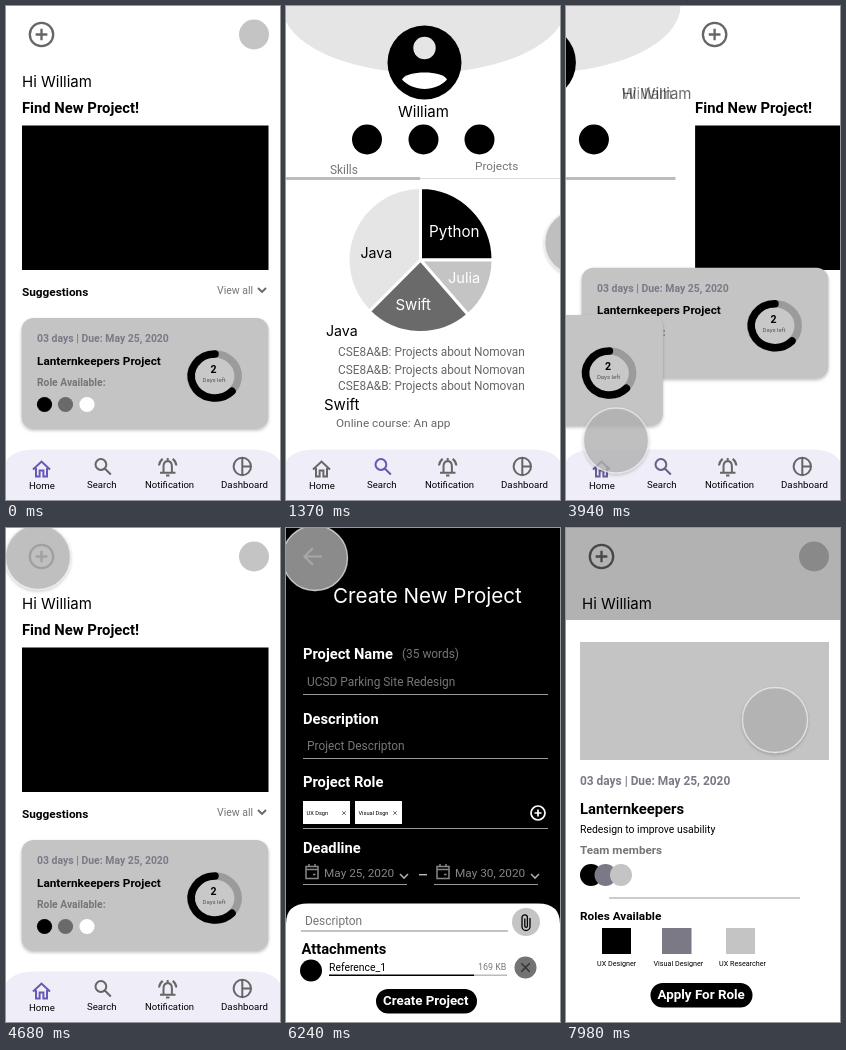
Write an HTML page that moves like this. It is 274 px wide and 494 px high and loops after 8 s.

```html
<!DOCTYPE html>
<html lang="en">
<head>
<meta charset="utf-8">
<title>Project finder prototype</title>
<style>
html, body { margin: 0; width: 100%; height: 100%; overflow: hidden; background: #fff; }
svg { display: block; width: 100vw; height: 100vh; }
text { font-family: Roboto, Arial, sans-serif; white-space: pre; }
.round { font-family: Inter, "Open Sans", sans-serif; }
.b { font-weight: 700; }
.line { fill: none; stroke: currentColor; stroke-width: 2; }
</style>
</head>
<body>
<svg id="stage" viewBox="0 0 274 494"></svg>
<script>
const GREY = '#757575', MUTED = '#7c7987', SILVER = '#c4c4c4';
const text = (x, y, size, s, fill = '#000', cls = '') =>
  `<text x="${x}" y="${y}" font-size="${size}" fill="${fill}" class="${cls}">${s}</text>`;
const bold = (x, y, size, s, fill) => text(x, y, size, s, fill, 'b');
const round = (x, y, size, s, fill) => text(x, y, size, s, fill, 'round');
const rect = (x, y, w, h, fill, rx = 0) =>
  `<rect x="${x}" y="${y}" width="${w}" height="${h}" rx="${rx}" fill="${fill}"/>`;
const dot = (x, y, r, fill) => `<circle cx="${x}" cy="${y}" r="${r}" fill="${fill}"/>`;
const line = (d, color, width = 2) =>
  `<path d="${d}" fill="none" stroke="${color}" stroke-width="${width}"/>`;
const plus = (x, y, r, color, w) =>
  `<circle cx="${x}" cy="${y}" r="${r}" fill="none" stroke="${color}" stroke-width="${w}"/>` +
  line(`M${x - r / 2} ${y}h${r}M${x} ${y - r / 2}v${r}`, color, w);
const cross = (x, y, r, color, w) =>
  line(`M${x - r} ${y - r}l${2 * r} ${2 * r}m0 ${-2 * r}l${-2 * r} ${2 * r}`, color, w);
const group = (id, body) => `<g id="${id}">${body}</g>`;

// Project card, drawn with its top edge at 0
const card = id => group(id,
  `<rect x="15.5" width="247" height="111" rx="12" fill="${SILVER}" filter="url(#soft)"/>` +
  bold(31, 24, 10.45, '03 days | Due: May 25, 2020', MUTED) +
  bold(31, 46.5, 11.8, 'Lanternkeepers Project') +
  bold(31, 68, 10.3, 'Role Available:', GREY) +
  dot(38.5, 86.5, 7.6, '#000') + dot(59.5, 86.5, 7.6, '#6a6a6a') + dot(81, 86.5, 7.6, '#fff') +
  `<ellipse cx="208.5" cy="58" rx="23.7" ry="22" fill="#c8c8c8" stroke="#9b9b9b" stroke-width="7.5"/>
  <path d="M209 36A23.7 22 0 1 0 226 73.3" fill="none" stroke="#000" stroke-width="7.5" stroke-linecap="round"/>` +
  bold(204.6, 55, 10.5, '2') + text(196.5, 64, 6, 'Days left', '#555'));

const slice = (from, to, fill) => {
  const at = a => `${134.5 + 72.5 * Math.sin(a * Math.PI / 180)} ${254 - 72.5 * Math.cos(a * Math.PI / 180)}`;
  return `<path d="M134.5 254L${at(from)}A72.5 72.5 0 0 1 ${at(to)}Z" fill="${fill}" stroke="#fff" stroke-width="3"/>`;
};

const home =
  plus(35.5, 28.5, 11.7, '#666', 2.3) + dot(248, 28.5, 15, SILVER) +
  bold(16, 107, 14.8, 'Find New Project!') + rect(16, 119.5, 246.5, 144.5, '#000') +
  bold(16, 290, 11.8, 'Suggestions') + text(211, 288, 10.5, 'View all', GREY) +
  line('M252 282l4 4l4-4', '#666', 1.8);

const profile =
  '<ellipse cx="138" cy="0" rx="142" ry="67" fill="#e5e5e5"/>' +
  dot(138.5, 56.5, 37, '#000') + dot(138.5, 42, 11.2, '#e5e5e5') +
  '<path d="M116 73.5C120 64 157 64 161 73.5C150 86 127 86 116 73.5Z" fill="#fff"/>' +
  [81, 137.5, 193.5].map(x => dot(x, 133.5, 15, '#000')).join('') +
  group('labels', text(44, 167.5, 11.9, 'Skills', GREY) + text(189, 164, 11.8, 'Projects', GREY) +
    rect(0, 172, 274, 1, '#ddd')) +
  '<rect id="tab" y="171" width="134" height="3" fill="#bcbcbc"/>';

const row = y => text(52, y, 11.85, 'CSE8A&amp;B: Projects about Nomovan', '#666');
const skills =
  slice(0, 90, '#000') + slice(90, 139, SILVER) + slice(139, 225, '#6a6a6a') + slice(225, 360, '#e5e5e5') +
  round(143, 231, 15.2, 'Python', '#fff') + round(162, 277, 14.6, 'Julia', '#fff') +
  round(109.5, 304, 15, 'Swift', '#fff') + round(74.5, 252, 14.2, 'Java') +
  round(40, 330, 14.2, 'Java') + row(349.5) + row(368) + row(383.5) +
  round(38, 404, 15, 'Swift') + text(50, 420.5, 11.8, 'Online course: An app', '#666');

const nav =
  '<path d="M0 494V455Q8 443.5 28 443.5H246Q266 443.5 274 455V494Z" fill="#efedf8"/>' +
  `<g id="homeIcon"><path class="line" d="M27 463.5L35.5 455.5L44 463.5M30 462v8.5h3.6v-6h3.8v6h3.6v-8.5"/></g>
  <g id="searchIcon"><path class="line" d="M100.3 458.5a5.4 5.4 0 1 1-10.8 0a5.4 5.4 0 1 1 10.8 0M98.8 462.5l6 6"/></g>
  <g color="#666"><path class="line" d="M157.5 466v-5.5q0-5 4.2-5.4q4.2.4 4.2 5.4v5.5M154 466.8h15.5M161.7 452v3M160 469.6h3.5
  M153 459.5q.4-4 3.7-6.6M170.4 459.5q-.4-4-3.7-6.6"/>
  <path class="line" d="M245 460.5a8.7 8.7 0 1 1-17.4 0a8.7 8.7 0 1 1 17.4 0M236.3 452v17M236.3 460.5h8.5"/></g>` +
  text(23, 483, 9.6, 'Home') + text(81, 482, 9.6, 'Search') +
  text(139, 482, 9.5, 'Notification') + text(215, 481.5, 9.7, 'Dashboard');

const chip = (x, w, s) => rect(x, 273, 47, 23, '#fff') + text(x + 3.5, 287, 5.7, s) + cross(x + w, 285, 1.8, '#333', .7);
const date = (x, s) =>
  line(`M${x + 3} 338.5h12v12h-12zM${x + 3} 341.5h12M${x + 6} 336v3M${x + 12} 336v3M${x + 10} 346.5h2.5`, '#888', 1.5) +
  text(x + 21, 348.5, 11.8, s, '#858585') + line(`M${x + 97} 346l4 4l4-4`, '#aaa', 1.6) +
  rect(x, 356, 104, 1, '#999');
const create =
  rect(0, 0, 274, 494, '#000') + line('M36 28.5H19M27 20l-8.5 8.5L27 37', '#888', 2.2) +
  round(47, 75, 20.6, 'Create New Project', '#fff') +
  bold(17, 131, 14.7, 'Project Name', '#fff') + text(116, 130, 11.9, '(35 words)', '#777') +
  text(21, 158, 11.9, 'UCSD Parking Site Redesign', '#777') + rect(17, 166, 245, 1, '#999') +
  bold(17, 196, 14.7, 'Description', '#fff') +
  text(21, 222, 11.9, 'Project Descripton', '#777') + rect(17, 230, 245, 1, '#999') +
  bold(17, 258.5, 14.7, 'Project Role', '#fff') + rect(17, 300, 245, 1, '#999') +
  chip(17, 41, 'UX Dsgn') + chip(69, 40, 'Visual Dsgn') + plus(252, 285, 7, '#fff', 1.7) +
  bold(17, 325, 14.7, 'Deadline', '#fff') + date(17, 'May 25, 2020') + date(148, 'May 30, 2020') +
  rect(133, 346, 8, 1.4, '#bbb') +
  '<path d="M0 494V396Q0 375.5 22 375.5H252Q274 375.5 274 396V494Z" fill="#fff"/>' +
  text(19, 396.5, 11.9, 'Descripton', GREY) + rect(15, 402.5, 207, 1, '#888') +
  dot(240, 394, 14, SILVER) +
  line('M244 390v8.5a4 4 0 0 1-8 0v-9a2.7 2.7 0 0 1 5.4 0v8.5a1.2 1.2 0 0 1-2.6 0v-7.5', '#000', 1.3) +
  bold(15.5, 426, 14.7, 'Attachments') + dot(25, 442.5, 11, '#000') +
  text(43, 443, 10.4, 'Reference_1') + text(192, 442, 8.9, '169 KB', GREY) +
  rect(43, 446.5, 145, 1.5, '#000') + rect(188, 446.5, 33, 1.5, '#bbb') +
  dot(239.5, 439.5, 11, '#737373') + cross(239.5, 439.5, 4.2, '#333', 1.5) +
  rect(90, 461, 101, 24.5, '#000', 12.2) + bold(97, 477, 13.3, 'Create Project', '#fff');

const detail =
  rect(0, 92, 274, 402, '#fff') + rect(14, 114, 249, 118, SILVER) +
  bold(14, 257, 11.9, '03 days | Due: May 25, 2020', MUTED) +
  bold(14, 286, 14.8, 'Lanternkeepers') + text(14, 305, 10.4, 'Redesign to improve usability') +
  bold(14, 326, 11.7, 'Team members', GREY) +
  dot(25, 347, 11, '#000') + dot(39.5, 347, 11, MUTED) + dot(55, 347, 11, SILVER) +
  rect(43, 369.5, 191, 1, '#999') + bold(14, 391.5, 11.8, 'Roles Available') +
  rect(36, 400, 29, 26, '#000') + rect(96, 400, 29.5, 26, MUTED) + rect(160, 400, 29, 26, SILVER) +
  text(31, 438, 7.2, 'UX Designer') + text(87.5, 438, 7.2, 'Visual Designer') + text(153, 438, 7.2, 'UX Researcher') +
  rect(84.5, 455, 102, 24.5, '#000', 12.2) + bold(91.5, 471, 13.4, 'Apply For Role', '#fff');

const stage = document.getElementById('stage');
stage.innerHTML =
  `<filter id="soft" x="-30%" y="-30%" width="160%" height="160%">
  <feDropShadow dx="0" dy="1.5" stdDeviation="1.5" flood-opacity=".25"/></filter>` +
  group('profile', profile + group('skills', skills)) + group('home', home) +
  group('name', round(0, 0, 15, 'William')) + group('greeting', round(0, 0, 15, 'Hi William')) +
  card('card') + card('card2') + nav + group('create', create) +
  '<rect id="shade" width="274" height="494"/>' + group('detail', detail) +
  `<g id="cursor" filter="url(#soft)"><circle r="32.5" fill="#b4b4b4" fill-opacity=".75" stroke="#eee" stroke-opacity=".75" stroke-width="1.3"/></g>`;
const el = {};
stage.querySelectorAll('[id]').forEach(e => el[e.id] = e);

// Cursor path: time, x, y
const path = [
  [0, 325, 330], [170, 316, 338], [480, 215, 405], [800, 97, 451], [1000, 97, 451],
  [1370, 291, 237], [1620, 258, 198], [1850, 219.5, 177],
  [2110, 219.5, 167], [2580, 219.5, 167], [2780, 165, 135], [2980, 95, 140], [3200, 60, 300],
  [3420, 47, 452], [3840, 50, 447], [3940, 50, 435], [4040, 50, 345], [4160, 48, 190], [4300, 43, 60],
  [4460, 34, 32], [4680, 32, 29], [4880, 32, 29], [5080, 45, 45], [5340, 130, 142], [5620, 180, 235],
  [5840, 125, 145], [6120, 29, 30], [6380, 29, 30],
  [6600, 72, 74], [6760, 135, 190], [6860, 160, 285], [6960, 132, 358], [7380, 132, 358],
  [7970, 209, 192], [8000, 209, 192]
];
const same = (a, b) => a[1] === b[1] && a[2] === b[2];
function slope(i, k) {
  const a = path[i - 1], b = path[i], c = path[i + 1];
  return !a || !c || same(a, b) || same(b, c) ? 0 : (c[k] - a[k]) / (c[0] - a[0]);
}
function cursorAt(t, k) {
  const i = path.findIndex(p => p[0] > t) - 1, a = path[i], b = path[i + 1];
  const d = b[0] - a[0], u = (t - a[0]) / d, s = u * u * (3 - 2 * u);
  return a[k] + (b[k] - a[k]) * s + d * u * (1 - u) * (slope(i, k) * (1 - u) - slope(i + 1, k) * u);
}

// Every page transition eases out over the same time
function ease(t, start) {
  const u = Math.min(1, Math.max(0, (t - start) / 400));
  return u * (2 - u);
}
const move = (e, x, y) => e.setAttribute('transform', `translate(${x} ${y})`);
const show = (e, on) => e.setAttribute('display', on ? 'inline' : 'none');
const tint = h => `rgb(${102 + 2 * h},${102 - 14 * h},${102 + 80 * h})`;

function draw(t) {
  const back = t >= 2250;
  const p = ease(t, back ? 3798 : 860);
  const out = -282 * p, into = 274 * (1 - p);
  const atHome = back ? p : 1 - p;
  move(el.home, back ? into : out, 0);
  move(el.profile, back ? out : into, 0);
  show(el.home, atHome > 0);
  show(el.profile, atHome < 1);
  show(el.skills, !back);
  show(el.labels, !back || p === 0);
  el.tab.setAttribute('x', back ? 141 : 0);
  move(el.card, back ? 0 : out, back ? 190 + 122 * p : 312);
  move(el.card2, out, 309);
  show(el.card2, back);
  for (const e of [el.name, el.greeting]) move(e, 112 - 96 * atHome, 110.5 - 30 * atHome);
  el.name.setAttribute('opacity', 1 - atHome);
  el.greeting.setAttribute('opacity', atHome);
  el.homeIcon.setAttribute('color', tint(atHome));
  el.searchIcon.setAttribute('color', tint(1 - atHome));

  // The form slides in and is closed with a cut
  move(el.create, 0, 494 * (1 - ease(t, 4870)));
  show(el.create, t > 4870 && t < 6250);

  const sheet = ease(t, 7230);
  el.shade.setAttribute('opacity', .3 * sheet);
  move(el.detail, 0, 402 * (1 - sheet));
  show(el.detail, sheet > 0);

  move(el.cursor, cursorAt(t, 1), cursorAt(t, 2));
}
function tick() {
  draw(performance.now() % 8000);
  requestAnimationFrame(tick);
}
tick();
</script>
</body>
</html>
```
